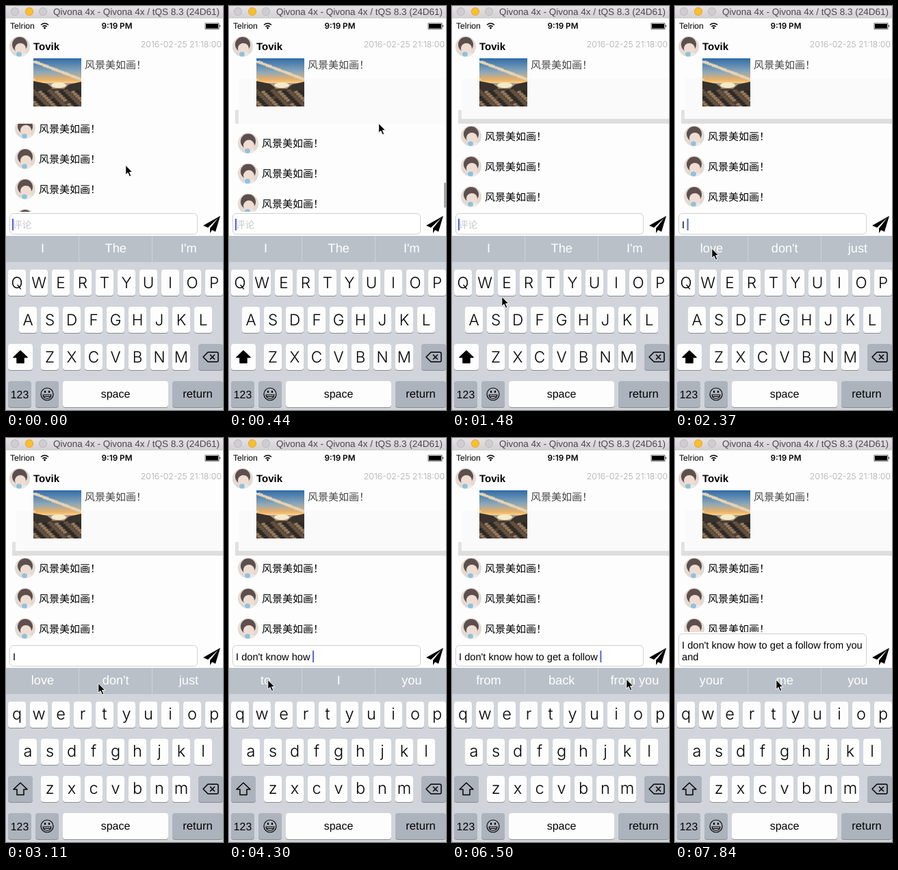
Write an HTML page with a canvas that moves like this. It is 317 by 587 pixels and loops after 8 s.

```html
<!DOCTYPE html>
<html lang="zh">
<head>
<meta charset="utf-8">
<title>Comment box</title>
<style>
  html, body { margin: 0; width: 100%; height: 100%; overflow: hidden; background: #fdfdfd; }
  canvas { display: block; width: 317px; height: 587px; }
</style>
</head>
<body>
<canvas id="stage"></canvas>
<script>
const W = 317, H = 587, LOOP = 8000, STEP = LOOP / 54;
const SANS = '"Liberation Sans", Arial, sans-serif';
const UI = 'Inter, sans-serif';
const CJK = '"Noto Sans CJK SC", "Noto Sans CJK", sans-serif';
const canvas = document.getElementById('stage');
const ratio = window.devicePixelRatio || 1;
canvas.width = W * ratio;
canvas.height = H * ratio;
const ctx = canvas.getContext('2d');
ctx.textRendering = 'geometricPrecision';

// Each entry: time, text in the field, word suggestions.
const typing = [
  [0, '', ['I', 'The', "I'm"]],
  [2360, 'I ', ['love', "don't", 'just']],
  [3250, "I don't ", ['know', 'want', 'think']],
  [3840, "I don't know ", ['how', 'what', 'if']],
  [4140, "I don't know how ", ['to', 'I', 'you']],
  [4580, "I don't know how to ", ['do', 'get', 'be']],
  [5030, "I don't know how to get ", ['a', 'the', 'my']],
  [5770, "I don't know how to get a ", ['new', 'follow', 'lot']],
  [6065, "I don't know how to get a follow ", ['from', 'back', 'from you']],
  [6655, "I don't know how to get a follow from you ", ['and', 'I', 'on']],
  [7100, "I don't know how to get a follow from you and ", ['your', 'me', 'you']]
];
const pointerPath = [
  [0, 174, 231], [150, 174, 231], [740, 262, 109], [890, 252, 130], [1180, 165, 322],
  [1480, 72, 422], [1780, 62, 405], [2200, 53, 352], [2520, 53, 352], [3110, 134, 356],
  [3260, 136, 355], [3700, 62, 352], [4300, 56, 351], [4580, 150, 352], [5030, 150, 352],
  [5480, 54, 349], [5780, 54, 349], [6065, 150, 351], [6500, 254, 350], [6670, 254, 350],
  [7000, 56, 350], [7110, 56, 350], [7840, 147, 351]
];
// Centre of the last list row: it scrolls past its end and springs back.
const scrollPath = [[0, 310], [150, 310], [740, 265], [890, 266], [1180, 277]];

function along(path, t) {
  const next = path.findIndex(p => p[0] > t);
  if (next < 0) return path[path.length - 1].slice(1);
  const a = path[next - 1], b = path[next];
  const u = (t - a[0]) / (b[0] - a[0]);
  const ease = u * u * (3 - 2 * u);
  return a.slice(1).map((v, i) => v + (b[i + 1] - v) * ease);
}

function rect(x, y, w, h, fill) {
  ctx.fillStyle = fill;
  ctx.fillRect(x, y, w, h);
}

function label(str, x, y, size, fill = '#000', { align = 'left', weight = '', family = SANS } = {}) {
  ctx.font = `${weight} ${size}px ${family}`;
  ctx.textAlign = align;
  ctx.fillStyle = fill;
  ctx.fillText(str, x, y);
}

function oval(x, y, rx, ry, fill, turn = 0) {
  ctx.fillStyle = fill;
  ctx.beginPath();
  ctx.ellipse(x, y, rx, ry, turn, 0, 7);
  ctx.fill();
}

function disc(x, y, r, fill) {
  oval(x, y, r, r, fill);
}

function shape(d, x, y, fill, stroke, width = 1.5) {
  ctx.save();
  ctx.translate(x, y);
  const path = new Path2D(d);
  if (fill) { ctx.fillStyle = fill; ctx.fill(path); }
  if (stroke) {
    ctx.strokeStyle = stroke;
    ctx.lineWidth = width;
    ctx.lineJoin = 'round';
    ctx.stroke(path);
  }
  ctx.restore();
}

function clipped(x, y, w, h, draw) {
  ctx.save();
  ctx.beginPath();
  ctx.rect(x, y, w, h);
  ctx.clip();
  draw();
  ctx.restore();
}

function avatar(x, y) {
  ctx.save();
  ctx.beginPath();
  ctx.arc(x, y, 15, 0, 7);
  ctx.clip();
  rect(x - 15, y - 15, 30, 30, '#e3dad3');
  oval(x, y - 3, 11, 11, '#5c4f4e');
  oval(x + 1, y + 3, 8, 8, '#f0ddd2');
  oval(x + 4, y + 14, 10, 5, '#eee8e6');
  oval(x - 1, y + 11, 4, 3.5, '#8fc2de');
  ctx.restore();
}

function landscape(x, y) {
  clipped(x, y, 70, 70, () => {
    const sky = ctx.createLinearGradient(0, y, 0, y + 37);
    sky.addColorStop(0, '#2f6ca8');
    sky.addColorStop(0.55, '#8fa9b8');
    sky.addColorStop(0.85, '#eeb062');
    sky.addColorStop(1, '#f8dc9c');
    rect(x, y, 70, 37, sky);
    for (let i = 0; i < 60; i++) {
      const cx = x + (i * 29) % 71, cy = y + 5 + (i * 11) % 27;
      oval(cx, cy, 2.4, 1.1, i % 3 ? '#ecd0a4' : '#d5d8d6', -0.5);
    }
    rect(x, y + 36, 70, 34, '#4b4037');
    rect(x, y + 36, 70, 8, '#a99a86');
    oval(x + 37, y + 39, 11, 4, '#f6e9c8');
    shape('M0 33L20 37L28 43L14 50L0 52Z M70 34L52 38L45 44L58 50L70 51Z', x, y, '#39322c');
    for (let i = 0; i < 70; i++) {
      const cx = x + (i * 23) % 72, cy = y + 47 + (i * 7) % 24;
      oval(cx, cy, 3, 1.8, ['#66523f', '#2b2825', '#96795b'][i % 3], -0.2);
    }
  });
}

function windowBars() {
  const bar = ctx.createLinearGradient(0, 0, 0, 18);
  bar.addColorStop(0, '#e4e2e4');
  bar.addColorStop(1, '#d2d0d2');
  rect(0, 0, W, 18, bar);
  [[13, '#cfcdcf', '#b5b3b5'], [34, '#fdbd2e', '#dfa023'], [54, '#cfcdcf', '#b5b3b5']].forEach(([x, fill, edge]) => {
    disc(x, 8, 6, edge);
    disc(x, 8, 5.2, fill);
  });
  label('Qivona 4x - Qivona 4x / tQS 8.3 (24D61)', 69, 13, 13.5, '#4a484a');

  label('Telrion', 6, 33, 12.2);
  shape('M-5.5 -3.5Q0 -8 5.5 -3.5M-3.2 -1Q0 -3.8 3.2 -1', 56.5, 31, null, '#000', 1.6);
  disc(56.5, 32, 1.4, '#000');
  label('9:19 PM', 162, 33, 11.7, '#000', { align: 'center', weight: 600, family: UI });
  shape('M0 0H20V8.5H0Z', 291, 25, null, '#000', 0.6);
  rect(292, 26, 18, 6.5, '#000');
  shape('M0 0Q2 2 0 4Z', 312, 27, '#000');
}

function post(t) {
  if (t > 440) {
    rect(14, 105, 303, 66, '#fafafa');
    rect(9, 151, 5, 20, '#e2e2e2');
  }
  if (t > 880) rect(9, 164, 308, 7, '#dedede');
  avatar(20, 59);
  label('Tovik', 40, 64, 15, '#000', { weight: 'bold' });
  label('2016-02-25 21:18:00', 315, 59.5, 12.3, '#aaa', { align: 'right', weight: 300, family: UI });
  landscape(40, 76);
  label('风景美如画！', 115, 91, 15, '#444', { family: CJK });
}

function comments(t, bottom) {
  const [last] = along(scrollPath, t);
  clipped(0, 171, W, bottom - 171, () => {
    for (let y = last; y > 140; y -= 44) {
      avatar(28, y);
      label('风景美如画！', 48, y + 5.5, 15, '#000', { family: CJK });
      if (t > 590 && t < 1030) rect(14, Math.round(y + 22), 303, 1, '#c4c4c6');
    }
  });
  if (t > 290 && t < 1470) {
    const over = Math.max(0, 277 - last), left = Math.max(0, last - 277);
    rect(314, 260 + over - left * 0.3, 3, 36 - over, '#a6a6a8');
  }
}

function wrap(text) {
  ctx.font = `14.64px ${SANS}`;
  const lines = [''];
  for (const word of text.match(/\S+ /g) || []) {
    const line = lines[lines.length - 1] + word;
    if (ctx.measureText(line.trimEnd()).width > 268) lines.push(word);
    else lines[lines.length - 1] = line;
  }
  return lines;
}

function commentField(t, since, lines) {
  const top = 301.5 - (lines.length - 1) * 17;
  rect(0, top - 2.5, W, 334 - top + 2.5, '#fdfdfd');
  ctx.beginPath();
  ctx.roundRect(5.5, top, 274, 331.5 - top, 5);
  ctx.fillStyle = '#fff';
  ctx.fill();
  ctx.strokeStyle = '#d0d0d2';
  ctx.lineWidth = 1;
  ctx.stroke();

  if (!lines[0]) label('评论', 9.5, 322.5, 14, '#c7c7cd', { family: CJK });
  lines.forEach((line, i) => label(line, 10, 323 - (lines.length - 1 - i) * 17, 14.64));
  if ((t - since) % 1000 < 500) {
    const end = ctx.measureText(lines[lines.length - 1]).width;
    rect(lines[0] ? 9.5 + end : 9, 309, 2, 17, '#4b67e0');
  }
  shape('M25 0L0 14L7 17L22 3L10 18V25L13 20.5L18 23Z', 288, 305, '#000');
}

function suggestions(t, words) {
  rect(0, 334, W, 38, '#b9c0c8');
  const pressed = (t > 2210 && t < 2350) || (t > 5620 && t < 5760);
  if (pressed) rect(0, 334, 106, 38, '#d1d5db');
  rect(106, 334, 1, 38, '#cdd2d8');
  rect(213, 334, 1, 38, '#cdd2d8');
  words.forEach((word, i) => label(word, 53.5 + i * 106.7, 357.5, 18.2, '#fff', { align: 'center' }));
}

function key(x, y, w, fill = '#fdfdfd') {
  [['#898c91', 1], [fill, 0]].forEach(([color, drop]) => {
    ctx.fillStyle = color;
    ctx.beginPath();
    ctx.roundRect(x, y + drop, w, 38, 4);
    ctx.fill();
  });
}

function keyboard(upper) {
  const gray = '#adb3bd';
  const letterStyle = { align: 'center', weight: 300, family: UI };
  rect(0, 372, W, 215, '#d1d5db');
  [['QWERTYUIOP', 3, 383], ['ASDFGHJKL', 19, 437], ['ZXCVBNM', 51, 491]].forEach(([row, left, y]) => {
    [...row].forEach((letter, i) => {
      const x = left + i * 32;
      key(x, y, 26);
      if (upper) label(letter, x + 13, y + 27, 22.5, '#000', letterStyle);
      else label(letter.toLowerCase(), x + 13, y + 25.5, 23.5, '#000', letterStyle);
    });
  });

  key(3, 491, 36, upper ? '#fdfdfd' : gray);
  shape('M0 -9.5L10 0H5V8H-5V0H-10Z', 21, 510.5, upper ? '#000' : null, '#000');
  key(281, 491, 36, gray);
  shape('M-11 0L-4 -7H9Q11 -7 11 -5V5Q11 7 9 7H-4ZM-1 -3.5L6 3.5M6 -3.5L-1 3.5', 299, 510, null, '#000');

  key(3, 545, 34, gray);
  label('123', 20, 570, 15.8, '#000', { align: 'center' });
  key(43, 545, 34, gray);
  shape('M9 0A9 9 0 1 1 -9 0A9 9 0 1 1 9 0ZM-6 1H6Q5 6.5 0 6.5Q-5 6.5 -6 1ZM-5 3.5H5', 60, 564, null, '#000', 1.2);
  oval(57, 560.5, 1.2, 1.7, '#000');
  oval(63, 560.5, 1.2, 1.7, '#000');
  key(83, 545, 154);
  label('space', 160, 569, 16, '#000', { align: 'center' });
  key(243, 545, 74, gray);
  label('return', 280, 569, 16.6, '#000', { align: 'center' });
}

function pointer(t) {
  const [x, y] = along(pointerPath, t);
  shape('M0 0V14L3.2 11L5.6 16.5L8 15.5L5.7 10.2H10Z', x + 0.8, y + 0.3, '#000', '#fff', 1);
}

function draw(t) {
  const [since, text, words] = typing.filter(entry => entry[0] <= t).pop();
  ctx.setTransform(ratio, 0, 0, ratio, 0, 0);
  rect(0, 0, W, H, '#fdfdfd');
  const lines = wrap(text);
  windowBars();
  post(t);
  comments(t, 299 - (lines.length - 1) * 17);
  commentField(t, since, lines);
  suggestions(t, words);
  keyboard(t < 2510);
  pointer(t);
}

function tick() {
  const t = performance.now() % LOOP;
  draw(Math.floor(t / STEP + 0.15) * STEP % LOOP);
  requestAnimationFrame(tick);
}
tick();
</script>
</body>
</html>
```
